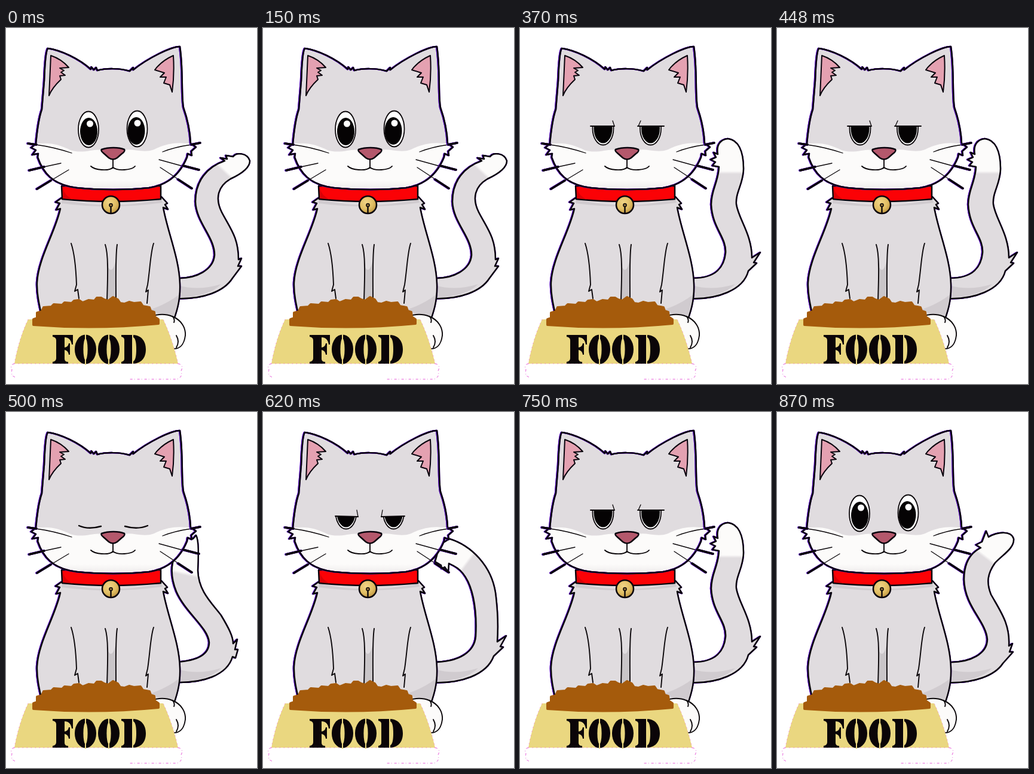
Recreate the animation shown at these times as an HTML page. Size 420 px wide and 595 px high, loop 1 s.

```html
<!DOCTYPE html>
<html lang="en">
<head>
<meta charset="utf-8">
<title>Hungry cat</title>
<style>
html, body { margin: 0; width: 100%; height: 100%; overflow: hidden; background: #fff; }
svg { display: block; width: 100vw; height: 100vh; }
.ink { stroke: #08020c; stroke-width: 2.5; stroke-linejoin: round; stroke-linecap: round; }
.fringe { filter: drop-shadow(-.6px .2px 0 #5208b8) drop-shadow(.5px 0 0 #5208b8); }
.fur { fill: #e0dcdf; }
.white { fill: #fcfbfa; }
.line { fill: none; stroke: #0a0609; stroke-width: 1.9; stroke-linecap: round; stroke-linejoin: round; }
.thin { stroke-width: 1.3; }
.firm { stroke-width: 2.4; }
.bold { stroke-width: 3.4; }
.pink { fill: #e4a1b1; stroke-width: 2; }
.shade { fill: #bcb7bb; opacity: .45; }

/* every pose is held, then switched at once */
.pose { visibility: hidden; animation: 1s step-end infinite; }
.up { animation-name: up; }
.squint { animation-name: squint; }
.sleepy { animation-name: sleepy; }
.shut { animation-name: shut; }
.drowsy { animation-name: drowsy; }
.back { animation-name: back; }
.awake { animation-name: awake; }
@keyframes up { 0% { visibility: visible } 25%, 100% { visibility: hidden } }
@keyframes squint { 25% { visibility: visible } 37%, 100% { visibility: hidden } }
@keyframes sleepy { 37%, 75% { visibility: visible } 50%, 87%, 100% { visibility: hidden } }
@keyframes shut { 50% { visibility: visible } 62%, 100% { visibility: hidden } }
@keyframes drowsy { 62% { visibility: visible } 75%, 100% { visibility: hidden } }
@keyframes back { 87%, 100% { visibility: visible } }
@keyframes awake { 0%, 87%, 100% { visibility: visible } 25% { visibility: hidden } }
</style>
</head>
<body>
<svg viewBox="0 0 420 595" preserveAspectRatio="none">
<defs>
  <linearGradient id="tip" gradientUnits="userSpaceOnUse" x1="0" y1="0" x2="0" y2="-5">
    <stop offset="0" stop-color="#e0dcdf"/><stop offset="1" stop-color="#fcfbfa"/>
  </linearGradient>
  <linearGradient id="tipUp" href="#tip" gradientTransform="translate(364 241) rotate(43)"/>
  <linearGradient id="tipSquint" href="#tip" gradientTransform="translate(348 247) rotate(15)"/>
  <linearGradient id="tipSleepy" href="#tip" gradientTransform="translate(352 244)"/>
  <linearGradient id="tipShut" href="#tip" gradientTransform="translate(300 273) rotate(12)"/>
  <linearGradient id="tipDrowsy" href="#tip" gradientTransform="translate(344 252) rotate(-53)"/>
  <linearGradient id="tipBack" href="#tip" gradientTransform="translate(351 247) rotate(37)"/>
  <linearGradient id="chin" x1="0" y1="0" x2="0" y2="1">
    <stop offset=".75" stop-color="#fcfbfa"/><stop offset="1" stop-color="#e9e6e6"/>
  </linearGradient>
  <radialGradient id="gold" cx=".4" cy=".35" r=".7">
    <stop offset="0" stop-color="#f0d486"/><stop offset=".6" stop-color="#e0bd62"/><stop offset="1" stop-color="#b98f3c"/>
  </radialGradient>
  <path id="skull" d="M70 34 C67 38 65 60 64 88 L60 136 C55 150 52 172 50 194 L42 200 L50 204 L44 212 L54 210 L53 216 C62 242 78 262 118 267 C155 271 205 271 240 267 C272 262 292 243 303 216 L304 210 L311 213 L310 206 L318 199 L309 193 C308 170 303 150 297 133 C293 110 297 70 291 31 C277 31 238 50 213 70 L213 66 L207 72 C190 67 168 67 153 71 L151 66 L147 70 L143 65 L142 69 C122 51 92 37 70 34Z"/>
  <clipPath id="inHead"><use href="#skull"/></clipPath>
  <ellipse id="white" cx="138" cy="169.500" rx="17" ry="30" fill="#fff" stroke="#0a0609" stroke-width="1.8"/>
  <g id="pupil">
    <ellipse cx="138.500" cy="173" rx="14.500" ry="23" fill="#050304"/>
    <circle cx="140.500" cy="160" r="5.500" fill="#fff"/>
  </g>
  <g id="eyes">
    <use href="#white"/><use href="#pupil"/>
    <use href="#white" x="81.500" y="-1"/><use href="#pupil" x="79.500" y="-1"/>
  </g>
  <g id="dull">
    <ellipse cx="139" cy="168" rx="17.500" ry="27.500" fill="#fff" stroke="#0a0609" stroke-width="1.8"/>
    <ellipse cx="139" cy="168" rx="15.500" ry="24.500" fill="#050304"/>
  </g>
  <g id="dullEyes"><use href="#dull"/><use href="#dull" x="79.500"/></g>
  <clipPath id="below152"><path d="M100 152h160v60H100z"/></clipPath>
  <clipPath id="below164"><path d="M100 164h160v60H100z"/></clipPath>
  <clipPath id="below175"><path d="M100 175h160v60H100z"/></clipPath>
  <g id="ring">
    <ellipse cx="0" cy="537" rx="18" ry="24.500" fill="#0b0508"/>
    <ellipse cx="0" cy="537" rx="3.600" ry="18" fill="#ead780"/>
    <path d="M-1 511h2v52h-2z" fill="#ead780"/>
  </g>
</defs>
<rect width="420" height="595" fill="#fff"/>

<!-- tail -->
<g class="ink fringe">
  <path class="pose up" fill="url(#tipUp)" d="M284 418 C320 420 347 403 349 380 C350 350 318 325 317 290 C317 255 337 232 366 222 L359 217 L370 219 L368 213 L380 215 C386 207 404 209 408 222 C408 235 391 245 376 252 C355 264 349 284 361 308 C375 335 389 350 389 387 L394 385 L388 398 L394 398 L379 418 C365 440 330 454 284 452Z"/>
  <path class="pose squint" fill="url(#tipSquint)" d="M284 418 C325 420 350 403 351 378 C350 355 315 325 314 285 C314 262 326 250 331 232 L325 231 L333 224 L327 209 L333 212 L336 199 C341 190 352 185 362 186 C375 188 378 205 375 220 C370 245 354 262 353 285 C353 310 388 340 391 379 L401 374 L393 390 L398 389 L384 404 C375 438 330 454 284 452Z"/>
  <path class="pose sleepy" fill="url(#tipSleepy)" d="M284 418 C330 420 342 397 344 376 C346 350 322 335 320 295 C320 270 332 258 333 232 L322 230 L327 224 L319 220 L328 216 L324 208 L331 211 C328 195 336 186 348 185 C365 187 374 205 374 235 C374 260 360 275 362 295 C366 320 388 345 388 384 L402 375 L391 392 L396 393 L382 406 C374 438 330 454 284 452Z"/>
  <path class="pose shut" fill="url(#tipShut)" d="M284 418 C320 416 340 405 340 385 C338 360 300 335 285 300 C277 280 276 262 280 248 L300 218 L304 210 L313 212 L318 206 C323 215 322 240 321 265 C322 300 345 320 360 340 C372 360 380 375 380 387 L387 380 L383 397 L388 397 L384 411 L379 409 C370 440 330 453 284 452Z"/>
  <path class="pose drowsy" fill="url(#tipDrowsy)" d="M284 418 C330 418 354 400 356 375 C358 340 355 275 319 257 L311 253 L310 267 L304 259 L299 262 L298 256 L288 250 L296 222 L312 212 C345 222 385 255 390 310 C394 345 393 370 392 384 L407 374 L397 392 L402 393 L386 408 C374 440 330 454 284 452Z"/>
  <path class="pose back" fill="url(#tipBack)" d="M284 418 C325 420 352 403 352 380 C350 350 314 325 313 280 C313 250 325 235 341 227 L333 222 L343 217 L345 212 L350 199 L354 209 C370 200 392 198 396 212 C397 228 378 238 365 252 C352 270 350 285 358 305 C375 335 390 355 388 391 L394 387 L389 401 L395 401 L378 420 C365 440 330 454 284 452Z"/>
</g>
<path class="shade" d="M288 430 Q322 440 360 428 Q338 450 288 450Z"/>

<!-- body -->
<path class="fur ink fringe" d="M93 284 L83 291 L90 293 L84 304 L91 302 C83 340 54 385 52 425 C51 448 58 472 64 500 H276 C286 475 292 455 291 428 C290 385 270 340 263 300 L271 303 L266 295 L270 293 L260 282Z"/>
<path class="shade" d="M94 287 Q176 305 260 287 L262 292 Q178 304 93 293Z"/>
<path class="shade" d="M238 472 Q268 462 289 446 Q287 468 279 484Z"/>
<path fill="#c2bec1" d="M167 388 C171 410 170 435 169 460 H185 C184 435 184 410 184 385 C180 410 172 410 167 388Z" opacity=".75"/>
<path class="line" d="M109 360 C114 375 117 400 118 429 L115 440 L120 437 L122 452 M166 362 C172 380 170 420 169 456 M186 362 C183 380 184 420 184 454 M247 360 C242 374 241 402 237 429 L234 441 L238 438 L236 460"/>
<path class="white line" style="fill:#fcfbfa" d="M236 488 C246 477 266 477 278 482 C294 488 301 502 300 514 C298 530 290 537 279 536 L250 525Z"/>
<path class="line" d="M279 482 Q283 488 281 492 M285 514 Q291 524 285 534"/>

<!-- collar -->
<path class="ink" fill="#fb0206" d="M93 264 H259 V286 Q176 294 94 286Z"/>
<path fill="#b90008" opacity=".5" d="M95 268 Q98 280 112 287 L95 285Z"/>

<!-- head -->
<use href="#skull" class="fur"/>
<g clip-path="url(#inHead)">
  <path fill="url(#chin)" d="M40 196 C68 189 87 194 108 204 C128 211 148 201 160 204 H198 C212 201 230 210 248 203 C270 192 290 189 322 196 V275 H40Z"/>
</g>
<use href="#skull" class="ink fringe" fill="none"/>
<g class="ink pink">
  <path d="M75 46 Q93 52 105 66 L90 67 L97 71 L92 74 L99 79 L90 80 L92 86 Q77 100 72 113Z"/>
  <path d="M280 46 Q260 55 249 70 L265 75 L258 82 L268 82 L264 92 L274 95 L278 107 Q282 78 280 46Z"/>
</g>
<path class="line thin" d="M50 195 Q80 199 110 209 M64 232 L92 226 M75 255 L105 237 M310 195 Q282 199 262 207 M256 220 L296 231 M258 233 L290 254"/>
<path class="line bold fringe" d="M37 193 L51 195 M39 238 L64 232 M52 269 L75 255 M325 192 L310 195 M296 230 L323 237 M288 253 L311 268"/>
<path class="ink" fill="#b4586c" d="M160 203 C171 199 189 199 198 203 Q200 206 194 210 L186 217 Q179 222 172 217 L163 209 Q158 205 160 203Z"/>
<path class="line" d="M179 220 V234 M142 231 Q147 236 160 237 Q174 238 179 233 Q186 238 198 237 Q212 236 216 231"/>

<!-- eyes -->
<use href="#eyes" class="pose awake"/>
<g class="pose squint">
  <g clip-path="url(#below152)"><use href="#eyes"/></g>
  <path class="line" d="M121 152 L158 153 L153 155 M237 152 L202 152 L207 155 M152 148 L156 153 M205 148 L203 152"/>
</g>
<g class="pose sleepy">
  <g clip-path="url(#below164)"><use href="#dullEyes"/></g>
  <path class="line" d="M118 164 H158 M197 164 H241"/>
  <path class="line thin" d="M155 155 L158 164 M202 155 L198 164"/>
</g>
<g class="pose drowsy">
  <g clip-path="url(#below175)"><use href="#dullEyes"/></g>
  <path class="line" d="M121 174 L159 175 M198 175 L237 174"/>
  <path class="line thin" d="M157 164 L159 175 M200 164 L198 175"/>
</g>
<path class="pose shut line firm" d="M122 190 Q138 197 159 191 M199 191 Q220 197 237 190"/>

<!-- bell -->
<circle class="ink" cx="175.500" cy="295.500" r="14.500" fill="url(#gold)"/>
<path class="line firm" d="M175.500 299 V309"/>
<circle cx="175.500" cy="296" r="2.600" fill="#9b7a3a" stroke="#0a0609" stroke-width="1.500"/>

<!-- bowl -->
<path fill="#fff" d="M13 561 Q6 563 10 571 Q7 583 16 583 Q150 591 286 587 Q296 584 293 573 Q298 563 288 561Z"/>
<path fill="none" stroke="#e65ad8" stroke-dasharray="4 4 1 3" d="M14 561 Q6 563 10 571 Q7 583 18 584 M288 561 Q298 563 293 573 Q296 584 286 587 L205 587"/>
<path fill="#ead780" d="M37 487 H263 Q278 518 288 561 H14 Q22 518 37 487Z"/>
<path fill="none" stroke="#ef7bc4" stroke-width=".8" stroke-dasharray="2 5" d="M37 487 Q22 518 14 561 H288 Q278 518 263 487"/>
<path fill="#a55b0c" stroke="#a55b0c" stroke-width="4" stroke-linejoin="round" d="M46 496 L46 487 L52 485 L52 476 L60 474 L63 467 L76 466 L80 462 L94 463 L98 459 L110 460 L114 456 L122 455 L128 459 L138 455 L148 456 L152 451 L159 451 L164 454 L171 456 L179 450 L187 454 L191 460 L198 461 L206 458 L214 460 L225 459 L229 465 L240 467 L242 473 L248 475 L249 483 L255 487 L255 494 Q150 504 46 496Z"/>

<!-- stencil lettering -->
<g role="img" aria-label="FOOD">
  <path fill="#0b0508" d="M78 513 H112 V529 H110 Q108 517 98 517 V534 Q104 533 105 527 H107 V546 H105 Q104 539 98 538 V553 Q98 558 104 558 V561 H78 V558 Q84 557 84 552 V522 Q84 517 78 516Z"/>
  <use href="#ring" x="133"/>
  <use href="#ring" x="172"/>
  <path fill="#0b0508" d="M193 513 H211 V561 H193 V558 Q198 557 198 553 V521 Q198 517 193 516Z M213 513 C228 514 234 525 234 537 C234 550 228 560 213 561 V557 Q218 555 218 537 Q218 519 213 517Z"/>
</g>
</svg>
</body>
</html>
```
